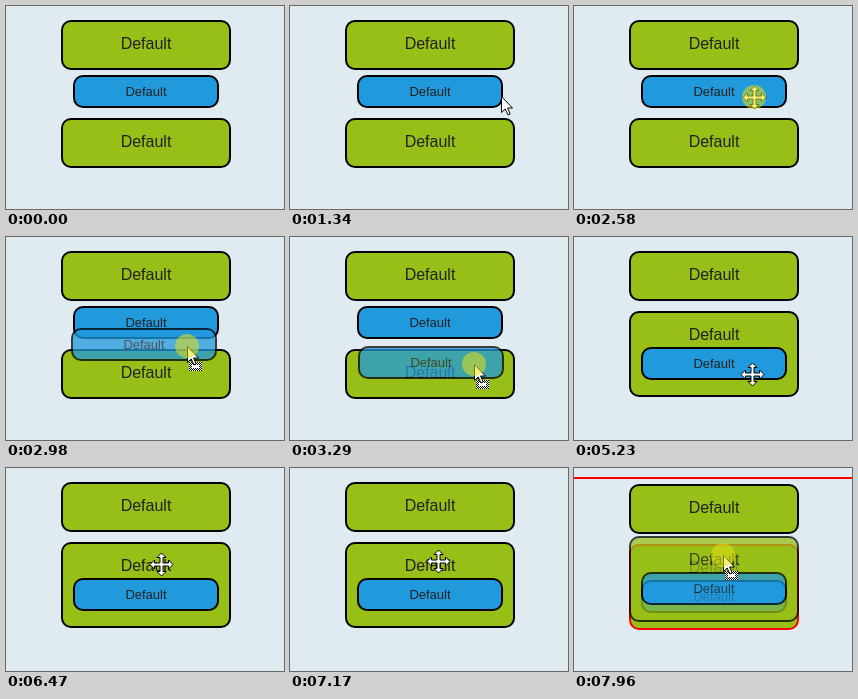
An HTML page for the animation above (8000 ms loop, 278x203 px).

```html
<!DOCTYPE html>
<html lang="en">
<head>
<meta charset="utf-8">
<title>Nested drag and drop</title>
<style>
  html, body { margin: 0; width: 100%; height: 100%; overflow: hidden; background: #e0eaf1; }
  svg { display: block; }
  text { font-family: Arial, "Liberation Sans", sans-serif; text-anchor: middle; fill: #222; }
</style>
</head>
<body>
<svg id="stage" width="278" height="203"></svg>
<script>
const LOOP = 8000, GREEN = '#98bf18', BLUE = '#2199dd', RED = '#f00';
const stage = document.getElementById('stage');

// Pointer moves: start, end, steps, from x, y, to x, y
const moves = [
  [500, 1190, 10, 250, 176, 215, 90],
  [1340, 1880, 8, 211, 90, 183, 87],
  [2190, 2190, 1, 182, 86, 182, 86],
  [2510, 2580, 2, 181, 89, 180, 91],
  [2660, 2980, 5, 180, 94, 181, 109],
  [3050, 3290, 4, 182, 114, 184, 127],
  [3360, 3770, 6, 184, 129, 181, 140],
  [5230, 5940, 10, 178, 137, 161, 102],
  [6090, 6470, 6, 160, 101, 155, 96],
  [6640, 7020, 6, 154, 96, 149, 94],
  [7170, 7170, 1, 148, 93, 148, 93],
  [7810, 7960, 3, 148, 92, 149, 87]
];

function pointerAt(t) {
  const move = moves.filter(m => m[0] <= t).pop();
  if (!move) return null;
  const [start, end, steps, x0, y0, x1, y1] = move;
  const gaps = steps - 1;
  const k = gaps ? Math.min(gaps, Math.floor((t - start) / (end - start) * gaps + 0.05)) / gaps : 0;
  return [Math.round(x0 + (x1 - x0) * k), Math.round(y0 + (y1 - y0) * k)];
}

function box(x, y, w, h, fill, size, baseline, stroke = '#000') {
  return `<rect x="${x + 1}" y="${y + 1}" width="${w - 2}" height="${h - 2}" rx="9" fill="${fill}" stroke="${stroke}" stroke-width="2"/>
    <text x="${x + w / 2}" y="${y + baseline}" font-size="${size}">Default</text>`;
}
const green = (x, y, h, stroke) => box(x, y, 170, h, GREEN, 16, 29, stroke);
const blue = (x, y, stroke) => box(x, y, 146, 33, BLUE, 13, 21, stroke);
const nest = (x, y, stroke) => green(x, y, 86, stroke) + blue(x + 12, y + 36);
const ghost = content => `<g opacity=".75">${content}</g>`;
const at = ([x, y], content) => `<g transform="translate(${x} ${y})">${content}</g>`;

// Four-way cursor: one arm turned in quarter steps
const arm = [[-1.5, -1.5], [-1.5, -7], [-4.5, -7], [0, -11.5], [4.5, -7], [1.5, -7]];
const cross = [0, 1, 2, 3].flatMap(q => arm.map(([x, y]) => {
  for (let i = 0; i < q; i++) [x, y] = [-y, x];
  return [x, y];
}));
const moveCursor = `<path d="M${cross.join('L')}Z" transform="translate(.5 .5)" fill="#fff" stroke="#000"/>`;
const arrow = '<path d="M.5 .5V16.5L4.2 13L7 19L9.2 18L6.6 12H11.5Z" fill="#fff" stroke="#000"/>';

function dottedFrame() {
  let dots = '';
  for (let y = 0; y < 9; y++) {
    for (let x = 0; x < 13; x++) {
      const edge = x < 3 || x > 9 || y < 3 || y > 5;
      if (edge && (x + y) % 2 === 0) dots += `M${x + 2} ${y + 16}h1v1h-1z`;
    }
  }
  return `<path d="M2 16h13v9h-13z" fill="#fff"/><path d="${dots}"/>`;
}
const dragCursor = dottedFrame() + arrow;
const pressMark = '<circle r="12" fill="#e1e114" fill-opacity=".55"/>';

function scene(t) {
  const dropped = t >= 4150;
  const dragBlue = t >= 2660 && !dropped;
  const dragNest = t >= 7880;
  const dragging = dragBlue || dragNest;
  const pressed = t >= 2510 && !dropped || t >= 7730;
  const refused = dragNest || t >= 2660 && t < 2900;
  const shift = refused ? 2 : 0;
  const border = refused ? RED : '#000';
  const pointer = t >= 4150 && t < 5230 ? [181, 140] : pointerAt(t);

  let out = refused ? `<rect y="9" width="278" height="2" fill="${RED}"/>` : '';
  out += green(55, 14 + shift, 50);
  out += dropped
    ? nest(55, 74 + shift, border)
    : blue(67, 69 + shift, border) + green(55, 112 + shift, 50);
  if (!pointer) return out;

  const [x, y] = pointer;
  if (dragBlue) out += ghost(blue(x - 116, y - 18));
  if (dragNest) out += ghost(nest(x - 94, y - 19));
  const cursor = dragging ? dragCursor : t < 1500 ? arrow : moveCursor;
  return out + at(pointer, cursor + (pressed ? pressMark : ''));
}

let shown = '';
function tick() {
  const next = scene(performance.now() % LOOP);
  if (next !== shown) stage.innerHTML = shown = next;
  requestAnimationFrame(tick);
}
tick();
</script>
</body>
</html>
```
